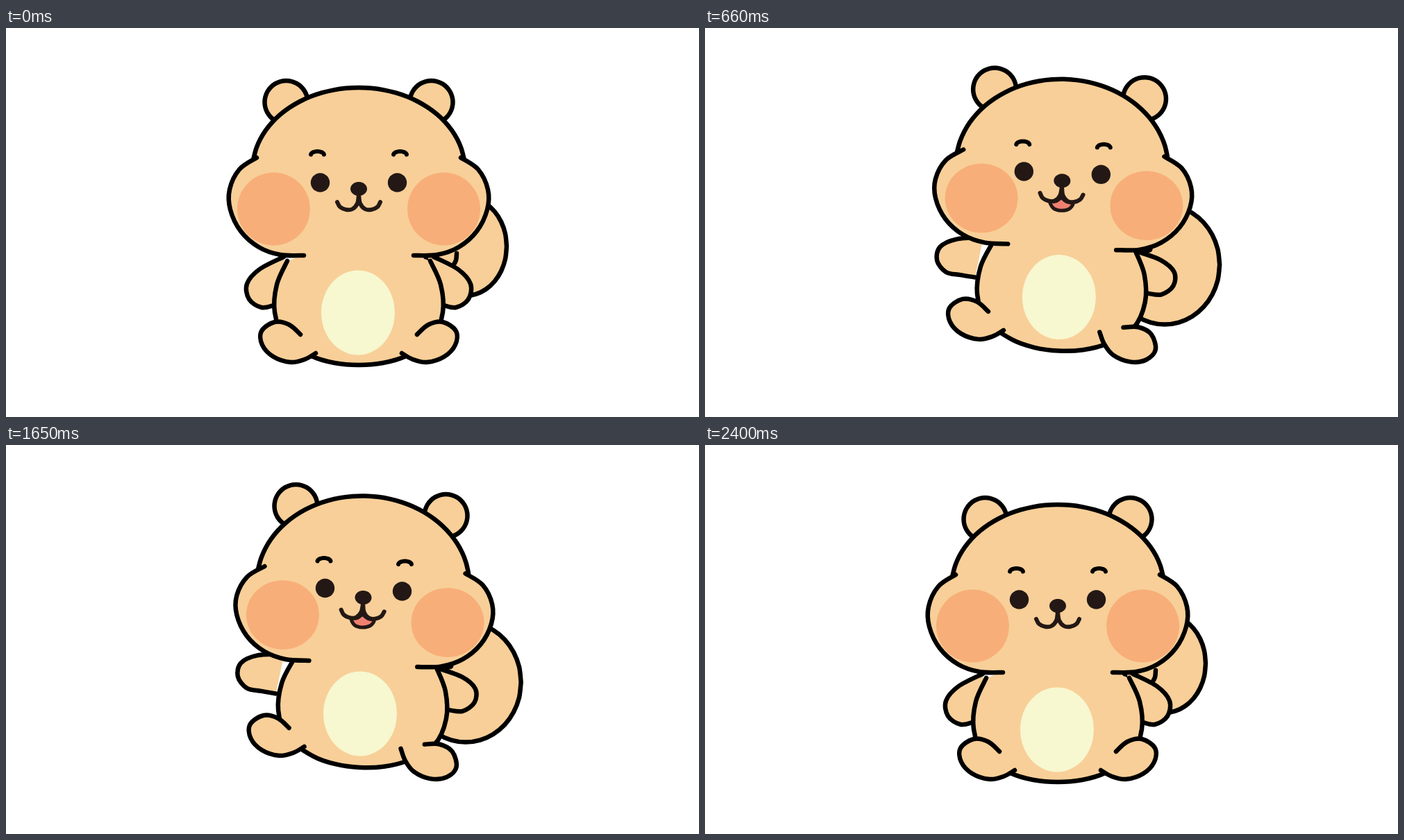
Recreate the animation shown at these times as an HTML page with a canvas. Size 998x561 px, loop 2530 ms.

```html
<!DOCTYPE html>
<html lang="en">
<head>
<meta charset="utf-8">
<title>Bouncing squirrel</title>
<style>
html, body { margin: 0; width: 100%; height: 100%; overflow: hidden; background: #fff; }
canvas { display: block; }
</style>
</head>
<body>
<canvas id="stage" width="998" height="561"></canvas>
<script>
const ctx = document.getElementById('stage').getContext('2d');
const FUR = '#f8cf98', BLUSH = '#f8ae79', BELLY = '#f7f7d0', DARK = '#231815', TONGUE = '#f08070';
const LOOP = 2530, STEP = 30, LAST_STEP = 80, LINE = 6.5, AXIS = 508;

// A move is [dx, dy, turn, scaleX, scaleY] about the pivot of a part.
const REST = [0, 0, 0, 1, 1];
let squash = 0, lean = 0;

function place(points, [px, py], low, tilt) {
  const [dx, dy, turn, sx, sy] = REST.map((r, i) =>
    r + squash * ((low[i] ?? r) - r) + lean * ((tilt[i] ?? r) - r));
  const c = Math.cos(turn), s = Math.sin(turn);
  return points.map(([x, y]) => {
    const u = (x - px) * sx, v = (y - py) * sy;
    return [px + dx + u * c - v * s, py + dy + u * s + v * c];
  });
}

const mirror = ([x, y]) => [2 * AXIS - x, y];
const symmetric = half => [...half, ...half.slice(0, -1).reverse().map(mirror)];

// Places a left part and its mirror image; squashing is symmetric, leaning is not.
function pair(points, pivot, low, tiltLeft, tiltRight) {
  const [dx, dy, turn = 0, ...scale] = low;
  return [
    place(points, pivot, low, tiltLeft),
    place(points.map(mirror), mirror(pivot), [-dx, dy, -turn, ...scale], tiltRight)];
}

function arc(cx, cy, rx, ry = rx, from = 0, to = 2 * Math.PI) {
  return Array.from({ length: 25 }, (_, i) => {
    const a = from + (to - from) * i / 24;
    return [cx + rx * Math.cos(a), cy + ry * Math.sin(a)];
  });
}

// Adds a smooth curve through the points to the path.
function curve(path, p, join) {
  const at = i => p[Math.max(0, Math.min(p.length - 1, i))];
  const handle = (a, b, c) => [0, 1].map(k => a[k] + (c[k] - b[k]) / 6);
  if (join) path.lineTo(...p[0]); else path.moveTo(...p[0]);
  for (let i = 0; i < p.length - 1; i++) {
    path.bezierCurveTo(
      ...handle(at(i), at(i - 1), at(i + 1)),
      ...handle(at(i + 1), at(i + 2), at(i)),
      ...at(i + 1));
  }
  return path;
}

function fill(path, color) {
  ctx.fillStyle = color;
  ctx.fill(path);
}

function line(p, inside, color = '#000', width = LINE) {
  const path = curve(new Path2D(), p);
  if (inside) fill(path, inside);
  ctx.strokeStyle = color;
  ctx.lineWidth = width;
  ctx.stroke(path);
}

const blot = (p, color) => fill(curve(new Path2D(), p), color);

function drawBack() {
  line(place(arc(662, 315, 59, 71), [662, 315], [-7, 10, 0, 1.08, 1.06], [0, 27, 0, 1.35, 1.22]), FUR);
  line(place([[649, 325], [648, 335], [643, 344]], [648, 335], [0, 0, 0, 1, 0.4], [-8, -15, 0, 1, 0.1]));
  pair(arc(403.5, 107, 31), [403.5, 107], [-7, 5], [14, -19], [21, -5]).forEach(p => line(p, FUR));
  const arm = [[400, 330], [365, 348], [347, 369], [350, 391], [368, 403], [389, 399], [410, 394]];
  pair(arm, [400, 332], [0, 2, 0.19, 1, 0.97], [0, -29, 0.38, 1, 0.9], [4, -9, -0.09, 1, 0.9])
    .forEach(p => line(p, FUR));
}

function drawBody() {
  const half = [[405, 336], [390, 370], [387, 410], [402, 448], [440, 473], [473, 483], [AXIS, 486]];
  const trunk = place(symmetric(half), [507, 410], [0, 3, 0, 1, 0.96], [5, -21, 0.05]);
  const [neck] = place([[AXIS, 300]], [AXIS, 300], [0, 4], [6, -15]);
  const path = curve(new Path2D(), trunk);
  path.lineTo(...neck);
  fill(path, FUR);
  line(trunk);
  blot(place(arc(507, 410.5, 53, 61), [507, 410.5], [0, 4, 0, 1, 0.935], [3, -23]), BELLY);
  const foot = [[424, 442], [408, 428], [387, 424], [368, 437], [369, 457], [385, 474], [410, 482], [430, 478], [446, 469]];
  pair(foot, [406, 452], [-9, -1], [-16.5, -34], [0, -1, 0.71]).forEach(p => line(p, FUR));
}

function drawHead() {
  const dome = place(arc(AXIS, 205, 153, 119, Math.PI + 0.15, 2 * Math.PI - 0.15),
    [AXIS, 136], [0, 8.5, 0, 1.01, 1.09], [8, -9.5, 0.024, 1, 1.06]);
  const cheek = [[361, 187], [336, 204], [322, 233], [323, 262], [338, 293], [364, 316], [395, 327], [429, 328]];
  const [left, right] = pair(cheek, [375, 255],
    [-3, 8, 0, 1, 0.93], [9.5, -15, 0.03, 1, 0.95], [6, -4.5, 0.01, 1, 0.96]);
  const path = curve(new Path2D(), dome);
  curve(path, right, true);
  curve(path, [...left].reverse(), true);
  fill(path, FUR);
  [dome, left, right].forEach(p => line(p));
}

function drawFace() {
  pair(arc(385.5, 261, 52.5), [385.5, 261], [0, 4, 0, 1, 0.925], [13, -16, 0, 1, 0.95], [5.5, -5, 0, 1, 0.95])
    .forEach(p => blot(p, BLUSH));
  pair(arc(452.5, 223, 13.7), [452.5, 223], [0, 5, 0, 1.15, 0.67], [7, -16.5], [7, -12])
    .forEach(p => blot(p, DARK));
  pair(arc(448.5, 183, 9.5, 5, Math.PI + 0.1, 2 * Math.PI - 0.1), [448.5, 180], [0, 6.5], [9.5, -15], [7, -10.5])
    .forEach(p => line(p, null, '#000', 6));

  const muzzle = p => place(p, [AXIS, 232], [0, 14.5, 0, 1, 0.95], [6.5, -12, 0.045]);
  blot(muzzle(arc(AXIS, 232, 12, 10)), DARK);
  if (lean > 0.5) {
    line(muzzle([[508, 256], [500, 262], [492, 263], [497, 272], [508, 275], [520, 272], [525, 264], [516, 262], [508, 256]]),
      TONGUE, DARK, 5);
  }
  const lip = [[508, 240], [506, 253], [499, 261], [490, 262], [481, 258], [477, 251]];
  [lip, lip.map(mirror)].forEach(p => line(muzzle(p), null, DARK, 6));
}

function keyed(t, keys) {
  const i = keys.findIndex(([time]) => t <= time);
  if (i < 1) return keys[i ? keys.length - 1 : 0][1];
  const [t0, a] = keys[i - 1], [t1, b] = keys[i];
  return a + (b - a) * (1 - Math.cos(Math.PI * (t - t0) / (t1 - t0))) / 2;
}

function draw(t) {
  squash = keyed(t, [[0, 0], [200, 1.35], [330, 0], [2160, 0], [2270, 1.9], [2400, 0]]);
  const jiggle = keyed(t, [[400, 0], [480, 0.24], [2050, 0.24], [2080, 0]]);
  lean = keyed(t, [[250, 0], [440, 1], [660, 0.9], [900, 1], [2050, 1], [2160, 0]])
    + jiggle * Math.sin(2 * Math.PI * (t - 50) / 200);

  ctx.fillStyle = '#fff';
  ctx.fillRect(0, 0, 998, 561);
  ctx.lineCap = ctx.lineJoin = 'round';
  drawBack();
  drawBody();
  drawHead();
  drawFace();
}

const start = performance.now();
function tick() {
  const t = (performance.now() - start) % LOOP;
  draw(Math.min(LAST_STEP, Math.floor(t / STEP)) * STEP);
  requestAnimationFrame(tick);
}
tick();
</script>
</body>
</html>
```
